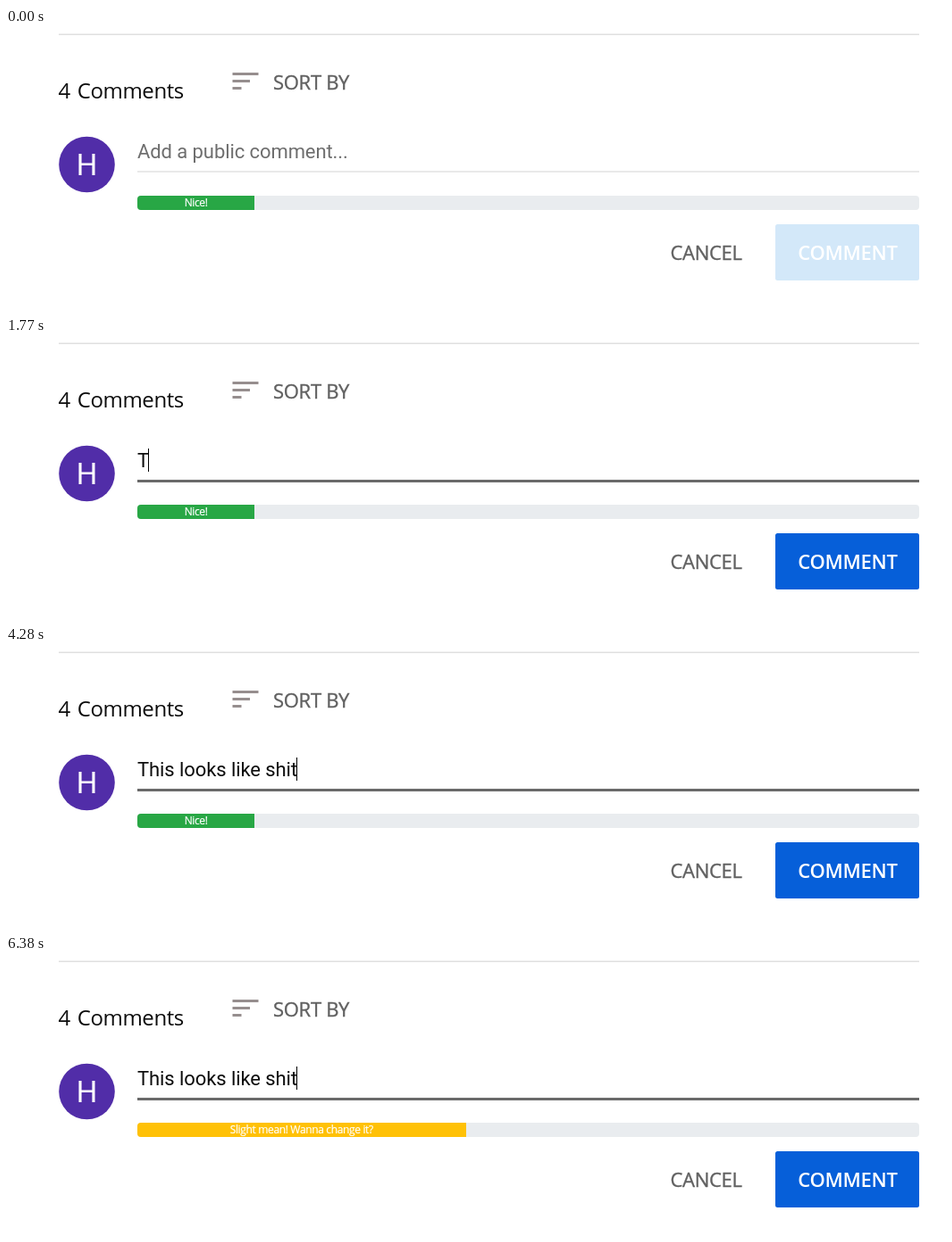
An HTML page that plays this animation: 1052 px wide and 315 px high, repeating every 6.7 s.

```html
<!DOCTYPE html>
<html lang="en">
<head>
<meta charset="utf-8">
<title>Comment box</title>
<style>
  html, body { margin: 0; width: 100%; height: 100%; overflow: hidden; background: #fff; }
  #stage { position: relative; width: 1052px; height: 315px; }
  svg { position: absolute; left: 0; top: 0; display: block; }
  text { white-space: pre; }
  .ui { font-family: "Open Sans", "Noto Sans", sans-serif; }
  .title { font-size: 24px; letter-spacing: -.4px; word-spacing: 2px; fill: #0d0d0d; }
  .label { font-size: 22px; letter-spacing: -.3px; text-anchor: middle; fill: #606060; stroke: #606060; stroke-width: .35px; }
  .strong { font-weight: 600; fill: #fff; stroke: none; }
  .input { font: 22px Roboto, sans-serif; letter-spacing: -.08px; }
  #track {
    position: absolute; left: 147px; top: 188px; width: 875px; height: 16px;
    border-radius: 4px; overflow: hidden; background: #e9ecef;
  }
  #bar {
    height: 16px; overflow: hidden; white-space: nowrap; text-align: center; color: #fff;
    font-size: 12px; line-height: 16px; letter-spacing: -.35px; -webkit-text-stroke: .2px #fff;
  }
</style>
</head>
<body>
<div id="stage">
  <svg width="1052" height="315">
    <rect x="59" y="6.5" width="963" height="1.5" fill="#e0e0e0"/>
    <text class="ui title" x="58.5" y="79">4 Comments</text>
    <g fill="#968e8e">
      <rect x="253.5" y="50" width="29" height="3"/>
      <rect x="253.5" y="58" width="19.5" height="3"/>
      <rect x="253.5" y="66" width="10" height="3"/>
    </g>
    <text class="ui label" x="341.5" y="69">SORT BY</text>

    <circle cx="90.5" cy="153" r="31.3" fill="#512da8"/>
    <text x="90.5" y="165" font-family="Roboto, sans-serif" font-size="33" text-anchor="middle" fill="#fff">H</text>

    <text id="hint" class="input" x="147" y="146" fill="#6e6e6e">Add a public comment...</text>
    <text id="typed" class="input" x="147" y="146" fill="#0d0d0d"></text>
    <rect x="147" y="160" width="875" height="2" fill="#e9e9e9"/>
    <rect id="line" y="160" height="3" fill="#6a6a6a"/>
    <rect id="caret" y="125" width="1" height="26"/>

    <text class="ui label" x="783.5" y="260">CANCEL</text>
    <rect id="button" x="861" y="220" width="161" height="63" rx="2.5"/>
    <text class="ui label strong" x="942" y="260">COMMENT</text>
  </svg>
  <div id="track"><div id="bar" class="ui"></div></div>
  <svg width="1052" height="315">
    <g id="pointer">
      <circle r="15" fill="#ff0" opacity=".53"/>
      <path id="beam" d="M-1 -6.5h6M2.5 -6v14M-1 8.5h6" fill="none" stroke="#333"/>
      <path id="arrow" d="M0 0v15l3.5-3.3 2.4 5 2-1-2.4-4.8h4.7z" fill="#fff" stroke="#000"/>
    </g>
  </svg>
</div>
<script>
const LOOP = 6700, LEFT = 147, WIDTH = 875;
const FOCUS = 785, BLINK = 523, KEY_TIME = 133;
const RATED = 4908, RATE_TIME = 600;

// when each word is started
const WORDS = [['This ', 1770], ['looks ', 2480], ['like ', 3330], ['shit', 3880]];
// pointer stops: time, x, y
const STOPS = [[150, 619, 211], [610, 350, 120], [759, 350, 120], [760, 336, 126], [850, 336, 126], [1080, 350, 244]];

const $ = id => document.getElementById(id);
const show = (el, on) => { el.style.display = on ? '' : 'none'; };
const clamp = x => Math.min(1, Math.max(0, x));
const mix = (a, b, p) => a + (b - a) * p;
const smooth = p => p * p * (3 - 2 * p);

// the CSS "ease" curve, cubic-bezier(.25, .1, .25, 1)
function ease(x) {
  const curve = (a, b, s) => 3 * a * s * (1 - s) ** 2 + 3 * b * s * s * (1 - s) + s ** 3;
  let lo = 0, hi = 1;
  for (let i = 0; i < 24; i++) {
    const mid = (lo + hi) / 2;
    if (curve(.25, .25, mid) < clamp(x)) lo = mid; else hi = mid;
  }
  return curve(.1, 1, lo);
}

function drawPointer(t) {
  const i = STOPS.findIndex(s => s[0] > t);
  show($('pointer'), i > 0);
  if (i < 1) return;
  const [t0, x0, y0] = STOPS[i - 1], [t1, x1, y1] = STOPS[i];
  const p = smooth((t - t0) / (t1 - t0));
  const y = mix(y0, y1, p);
  $('pointer').setAttribute('transform', `translate(${mix(x0, x1, p)} ${y})`);
  show($('beam'), y < 165);
  show($('arrow'), y >= 165);
}

function drawInput(t) {
  let text = '', lastKey = FOCUS;
  for (const [word, start] of WORDS) {
    if (t < start) break;
    const keys = Math.min(word.length, Math.floor((t - start) / KEY_TIME) + 1);
    text += word.slice(0, keys);
    lastKey = start + (keys - 1) * KEY_TIME;
  }
  const typed = $('typed'), caret = $('caret'), line = $('line');
  typed.textContent = text;
  show($('hint'), !text);
  show(caret, t >= FOCUS && Math.floor((t - lastKey) / BLINK) % 2 === 0);
  caret.setAttribute('x', Math.floor(LEFT - .5 + (text ? typed.getComputedTextLength() : .5)));

  const grow = ease((t - FOCUS) / 250);
  line.setAttribute('x', LEFT + WIDTH * (1 - grow) / 2);
  line.setAttribute('width', WIDTH * grow);
  $('button').setAttribute('fill', text ? '#065fd9' : '#d3e8f9');
}

function drawBar(t) {
  const bar = $('bar'), mean = t >= RATED;
  bar.style.width = WIDTH * mix(.15, .42, ease((t - RATED) / RATE_TIME)) + 'px';
  bar.style.background = mean ? '#ffc107' : '#28a745';
  bar.textContent = mean ? 'Slight mean! Wanna change it?' : 'Nice!';
}

const origin = performance.now();
function frame() {
  const t = (performance.now() - origin) % LOOP;
  drawPointer(t);
  drawInput(t);
  drawBar(t);
  requestAnimationFrame(frame);
}
frame();
</script>
</body>
</html>
```
